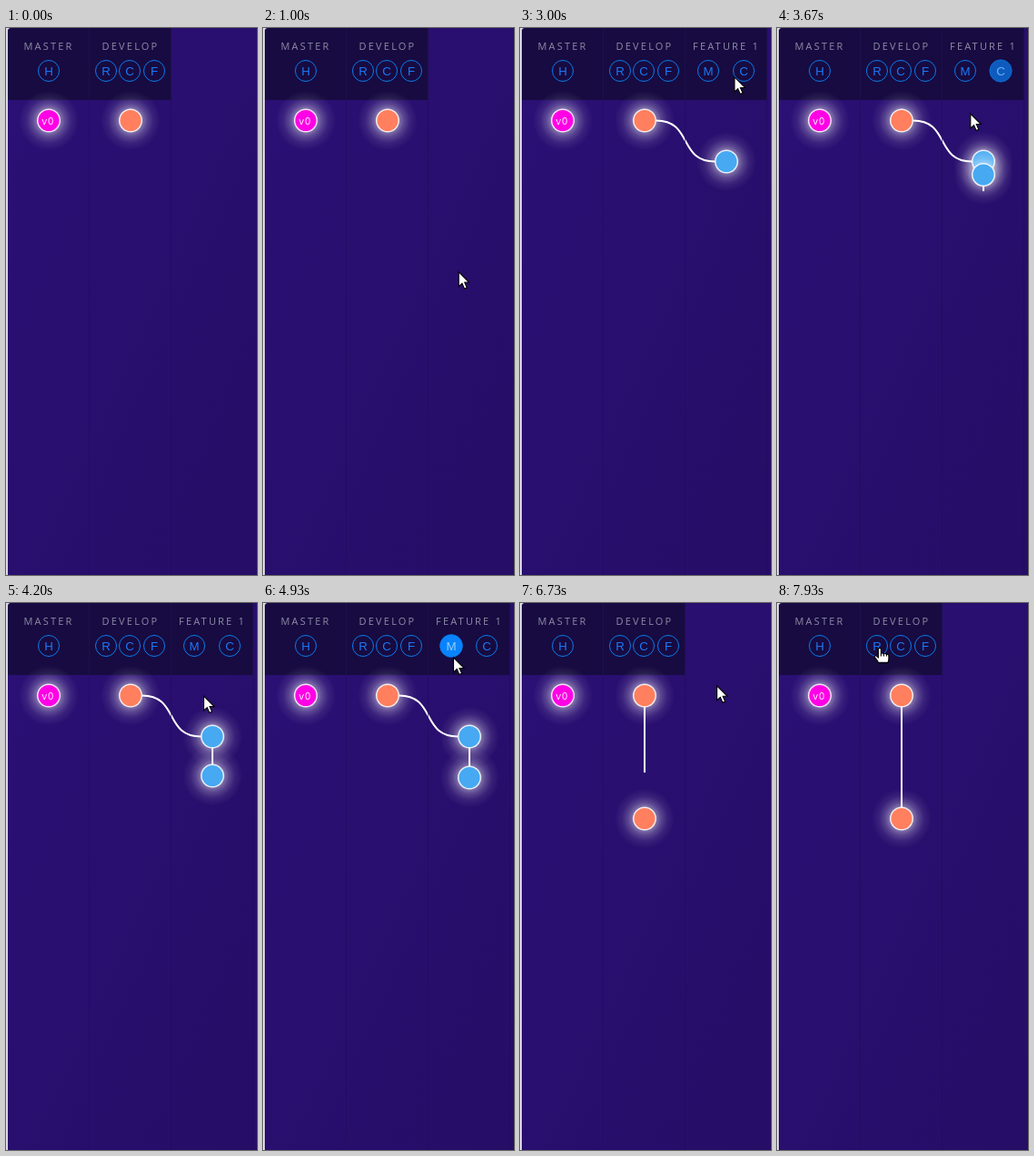
An HTML page for the animation above (8000 ms loop, 276x600 px).

```html
<!DOCTYPE html>
<html lang="en">
<head>
<meta charset="utf-8">
<title>Branch graph</title>
<style>
html, body { margin: 0; width: 100%; height: 100%; overflow: hidden; background: #dcd8e6; }
svg { display: block; }
text { text-anchor: middle; }
.title { font: 11px "Open Sans", sans-serif; letter-spacing: 2.2px; fill: #8f8ba6; }
.tag { font: 11px "Open Sans", sans-serif; letter-spacing: 1px; fill: #fff; }
.key { font: 13.33px "Liberation Sans", Arial, sans-serif; }
.link { fill: none; stroke: #fff; stroke-width: 2; }
</style>
</head>
<body>
<svg width="276" height="600" viewBox="0 0 276 600">
  <defs>
    <linearGradient id="bg" x1="0" y1="0" x2="1" y2="1">
      <stop offset="0" stop-color="#2b1076"/>
      <stop offset="1" stop-color="#260d66"/>
    </linearGradient>
    <radialGradient id="glow">
      <stop offset=".38" stop-color="#fff" stop-opacity=".43"/>
      <stop offset=".55" stop-color="#fff" stop-opacity=".23"/>
      <stop offset=".75" stop-color="#fff" stop-opacity=".08"/>
      <stop offset="1" stop-color="#fff" stop-opacity="0"/>
    </radialGradient>
    <clipPath id="panel"><path d="M2 600V4Q2 0 6 0H276V600Z"/></clipPath>
  </defs>
  <g clip-path="url(#panel)">
    <rect width="276" height="600" fill="url(#bg)"/>
    <g id="scene"></g>
  </g>
</svg>
<script>
const LOOP = 8000;
const BRANCH = 1650, COMMIT = 3550, MERGE = 4980, REMOVE = 6641, RELEASE = 8500;
const LAG = 300, HOLD = 180, GLIDE = 220;
const ROW = 45, RADIUS = 12.5;
const MASTER = 47, DEVELOP = 137, FEATURE = 227;
const MAGENTA = '#ff00e6', CORAL = '#ff7f5f', BLUE = '#46a9f2', GREY = '#948bbc';
const scene = document.getElementById('scene');

const clamp = v => Math.max(0, Math.min(1, v));
const mix = (a, b, k) => a + (b - a) * k;
const smooth = v => v * v * (3 - 2 * v);
const easeOut = v => 1 - (1 - clamp(v)) ** 3;
const rowY = row => 101.5 + ROW * row;

// Each click comes LAG ms before the change it causes
const buttons = [
  { x: 47, label: 'H' },
  { x: 110, label: 'R', effect: RELEASE },
  { x: 136, label: 'C' },
  { x: 163, label: 'F', effect: BRANCH },
  { x: 207, label: 'M', effect: MERGE, from: BRANCH, to: MERGE },
  { x: 246, label: 'C', effect: COMMIT, from: BRANCH, to: MERGE },
  { x: 227, label: '×', effect: REMOVE, from: MERGE, to: REMOVE }
].map(b => ({ from: 0, to: LOOP, click: (b.effect ?? Infinity) - LAG, ...b }));

// Where the pointer rests between clicks: time, x, y
const rests = [
  [900, 225, 310], [1800, 181, 90], [2700, 201, 74], [4200, 217.5, 102],
  [6730, 216.5, 91], [7100, 180, 150], [LOOP, 117, 52]
];

function header(x, title, opacity = 1) {
  return `<g opacity="${opacity}"><rect x="${x - 45}" width="90" height="79" fill="#170b41"/>
    <path d="M${x + 44.5} 0V79" stroke="#1e104c"/>
    <text class="title" x="${x}" y="24">${title}</text></g>`;
}

function button({ x, label, click }, t) {
  const enter = clamp((t - click + 250) / 200), leave = clamp((t - click - 250) / 500);
  const hover = Math.min(enter, 1 - leave);
  const ink = `color-mix(in srgb, #8fd0ff ${hover * 100}%, #1c78f5)`;
  const mark = label === '×'
    ? `<path d="M${x - 3.5} 43.5l7 7m0-7l-7 7" stroke="${ink}" stroke-width="1.3"/>`
    : `<text class="key" x="${x}" y="52" style="fill:${ink}">${label}</text>`;
  return `<circle cx="${x}" cy="47" r="${11.5 + hover}" fill="#0a84ff" fill-opacity="${hover}"
    stroke="#0a7cec" stroke-opacity="${1 - hover / 2}"/>${mark}`;
}

// A new node drops in from the row above
function node(x, row, color, born = -LOOP, t = 0) {
  if (t < born) return '';
  const y = rowY(row - 1 + easeOut((t - born) / 1000));
  return `<g transform="translate(${x} ${y})" opacity="${clamp((t - born) / 120)}">
    <circle r="33" fill="url(#glow)"/>
    <circle r="12.25" fill="${color}" stroke="#fff" stroke-opacity=".85" stroke-width="1.5"/></g>`;
}

const spent = (x, row) => `<circle cx="${x}" cy="${rowY(row)}" r="${RADIUS}" fill="${GREY}"/>`;

// Lines are drawn on at a constant speed
function link(d, born, t) {
  return t < born ? '' : `<path class="link" d="${d}" stroke-dasharray="${(t - born) * .8} 999"/>`;
}

const straight = (x, row1, row2) => `M${x} ${rowY(row1) + RADIUS}V${rowY(row2) - RADIUS}`;

function curve(x1, row1, x2, row2) {
  const dir = Math.sign(x2 - x1), a = x1 + RADIUS * dir, b = x2 - RADIUS * dir;
  const y1 = rowY(row1), y2 = rowY(row2);
  return `M${a} ${y1}C${a + 41 * dir} ${y1} ${b - 41 * dir} ${y2} ${b} ${y2}`;
}

function pointer(t) {
  const i = rests.findIndex(r => r[0] > t);
  if (i < 1) return '';
  const [t0, x0, y0] = rests[i - 1], [t1, x1, y1] = rests[i];
  const k = smooth((t - t0) / (t1 - t0));
  let x = mix(x0, x1, k), y = mix(y0, y1, k);
  for (const b of buttons) {
    const pull = smooth(clamp((HOLD + GLIDE - Math.abs(t - b.click)) / GLIDE));
    x = mix(x, b.x, pull);
    y = mix(y, 47, pull);
  }
  const over = buttons.some(b => t >= b.from && t < b.to && Math.hypot(x - b.x, y - 47) < 12);
  const shape = over
    ? 'M-1.5 1q1.5-2 3 0V6q2-1 3 .5 2-1 3 .5 2-.5 2.5 1V12q0 2-1 4H-2V14.5L-5.5 10q-.5-2 1.5-1.5L-1.5 10.5ZM1.5 6V9M4.5 6.5V9M7.5 7V9'
    : 'M0 0V16L3.7 12.6 6.3 18.5 9 17.3 6.5 11.5H11.5Z';
  return `<path transform="translate(${x} ${y})" d="${shape}" fill="#fff" stroke="#000" stroke-width="1.1"/>`;
}

function draw(t) {
  const open = t >= BRANCH && t < REMOVE;
  let out = header(MASTER, 'MASTER') + header(DEVELOP, 'DEVELOP');
  if (open) out += header(FEATURE, 'FEATURE 1', clamp((t - BRANCH) / 180));
  out += buttons.filter(b => t >= b.from && t < b.to).map(b => button(b, t)).join('');

  if (open) {
    out += link(curve(DEVELOP, 0, FEATURE, 1), BRANCH, t)
      + link(straight(FEATURE, 1, 2), COMMIT, t)
      + link(curve(FEATURE, 2, DEVELOP, 3), MERGE, t);
  }
  out += link(straight(DEVELOP, 0, 3), open ? MERGE : REMOVE, t);

  out += `<path d="M91.5 79V600M181.5 79V600${open ? 'M271.5 79V600' : ''}"
    stroke="#220b5e" stroke-opacity=".6"/>`;

  out += node(MASTER, 0, MAGENTA) + `<text class="tag" x="${MASTER - .5}" y="106">v0</text>`
    + node(DEVELOP, 0, CORAL) + node(DEVELOP, 3, CORAL, MERGE, t);
  if (open) {
    out += t >= MERGE
      ? spent(FEATURE, 1) + spent(FEATURE, 2)
      : node(FEATURE, 1, BLUE, BRANCH, t) + node(FEATURE, 2, BLUE, COMMIT, t);
  }
  scene.innerHTML = out + pointer(t);
}

const start = performance.now();
function tick() {
  draw((performance.now() - start) % LOOP);
  requestAnimationFrame(tick);
}
tick();
</script>
</body>
</html>
```
